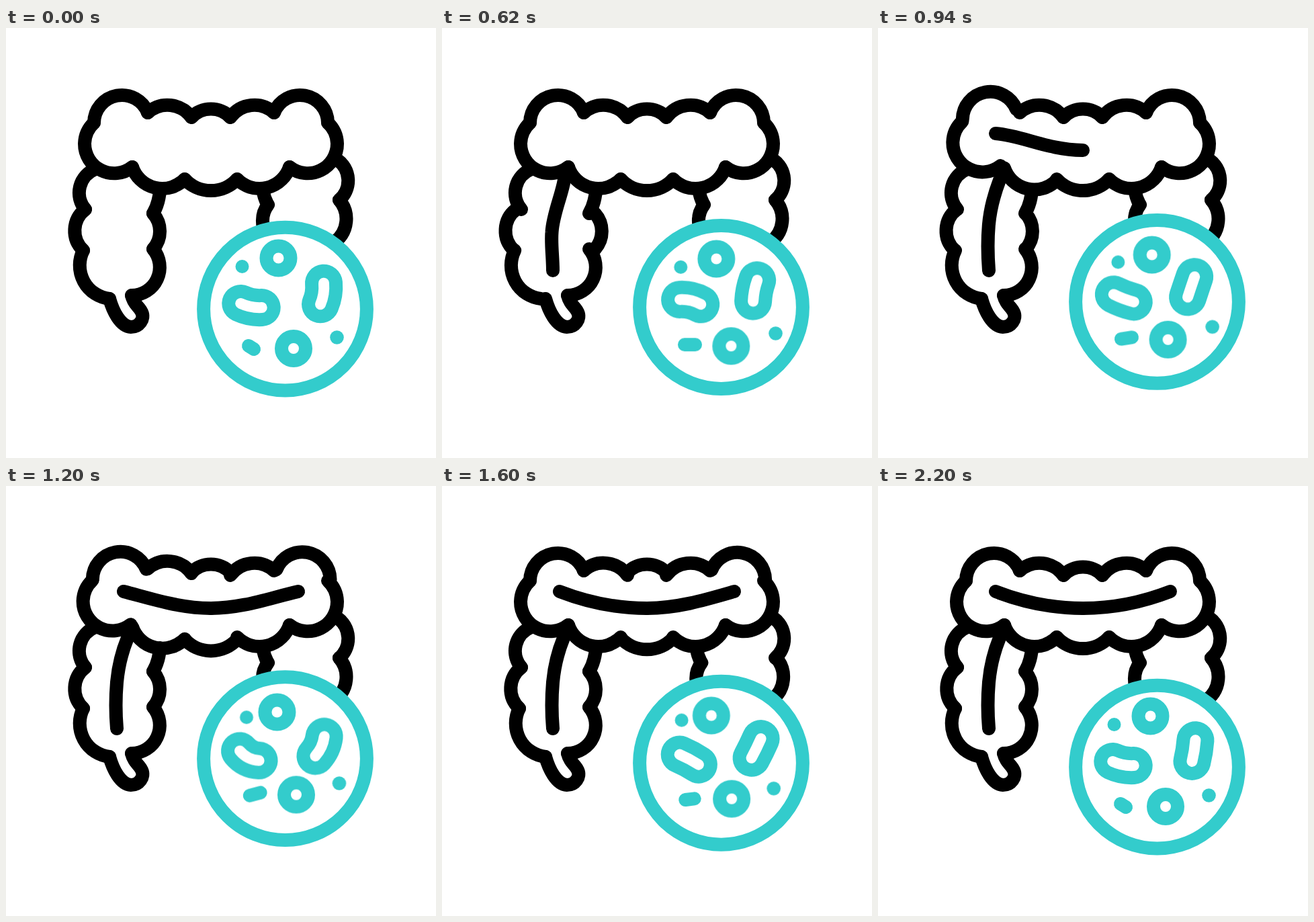
These frames come from a looping animation (640x640 px, 2.4 s). An HTML page without scripts:

```html
<!DOCTYPE html>
<html lang="en">
<head>
<meta charset="utf-8">
<title>Gut flora</title>
<style>
html, body { margin: 0; width: 100%; height: 100%; overflow: hidden; background: #fff; }
svg { display: block; width: 100%; height: 100%; }
path, circle { fill: none; stroke-width: 20; stroke-linecap: round; stroke-linejoin: round; }
.gut { stroke: #000; }
.lens { stroke: #33cccc; }
.dot { fill: #33cccc; stroke: none; }
.plate { fill: #fff; }

/* halves of the crossing part, drawn once and mirrored */
.corner { d: path("M131,141A41.5,41.5 0 0 1 211,126"); }
.small { d: path("M211,126A44,44 0 0 1 276,133"); }
.under { d: path("M266,225A47,47 0 0 1 188,207"); }
.side { d: path("M188,207A44,44 0 0 1 117,172A44,44 0 0 1 131,141"); }

/* every lobe swells once by (--x, --y); --t is when its wave arrives */
[style*="--t"] { animation: swell 2400ms ease-in-out var(--t) infinite; }
.gut .band { animation-name: bend; }
.gut .riseband { animation-name: lean; }
@keyframes swell {
  0%, 30%, 100% { translate: 0 0; }
  15% { translate: var(--x, 0px) var(--y, 0px); }
}
@keyframes bend {
  0%, 30%, 100% { d: path("M175,157C218,173.7 262,182 305,182"); }
  15% { d: path("M175,157C218,160 250,181 305,182"); }
}
@keyframes lean {
  0%, 30%, 100% { d: path("M181,226C172,248 167,270 165,292C163,315 163,338 165,361"); }
  15% { d: path("M182,226C178,250 165,278 163.5,304C162,322 165,340 165,361"); }
}

/* the lens rises and sinks, its contents float inside it */
.lens { animation: bob 2400ms infinite; }
.cell { animation: drift 2400ms infinite, sway 2400ms ease-in-out infinite; }
.pod { animation: drift 2400ms infinite, turn 2400ms ease-in-out infinite; }
.pod path { animation: wiggle 2400ms linear var(--lag, 0ms) infinite backwards; stroke-width: 56; }
.pod .core { stroke: #fff; stroke-width: 16; }
.pill { animation: pill 2400ms linear infinite; }
@keyframes bob {
  0%, 9.17% { translate: 0 0; animation-timing-function: cubic-bezier(.65, 0, .5, 1); }
  50% { translate: 0 -12.5px; animation-timing-function: cubic-bezier(.3, 0, .4, 1); }
  91.67%, 100% { translate: 0 0; }
}
@keyframes drift {
  0%, 9.17% { translate: 0 0; animation-timing-function: ease-out; }
  50% { translate: var(--x, 0px) var(--y, 0px); animation-timing-function: ease-in; }
  91.67%, 100% { translate: 0 0; }
}
@keyframes sway {
  0%, 9.17%, 91.67%, 100% { transform: translate(0, 0); }
  32% { transform: translate(var(--sx, 0px), var(--sy, 0px)); }
  63% { transform: translate(calc(-1 * var(--sx, 0px)), calc(-1 * var(--sy, 0px))); }
}
@keyframes turn {
  0%, 15%, 91.67%, 100% { rotate: var(--a); }
  62% { rotate: calc(var(--a) + 18deg); }
}
@keyframes wiggle {
  0%, 9.17%, 91.67%, 100% { d: path("M-16,0Q0,4 16,0"); }
  25.83% { d: path("M-12,-3.5Q4,-8 20,-3.5"); }
  50% { d: path("M-18,2Q-2,9 14,2"); }
  75.83% { d: path("M-11,-3Q5,-9 21,-3"); }
}
@keyframes pill {
  0%, 9.17%, 91.67%, 100% { d: path("M361,473L369,478"); }
  25.83% { d: path("M361,474L377,474"); }
  54% { d: path("M363,473L379,468"); }
}
</style>
</head>
<body>
<svg viewBox="0 0 640 640">
  <g class="gut">
    <!-- right side, going down -->
    <path d="M493,196A38,38 0 0 1 496,256"/>
    <path d="M496,256A43,43 0 0 1 490,318" style="--x:4px;--t:1440ms"/>
    <path d="M383,243Q384,254 390,263Q379,277 383,297" style="--x:-9px;--t:1440ms"/>

    <!-- left side, going up -->
    <path d="M133,210A38,38 0 0 0 118,270"/>
    <path d="M118,270A40,40 0 0 0 115,331" style="--x:-8px;--t:300ms"/>
    <path d="M115,331A50,50 0 0 0 154,403" style="--x:-7px;--t:220ms"/>
    <path d="M154,403C159,421 170,444 186,445C198,445 207,433 202,423C198,414 190,412 187,398"/>
    <path d="M187,398A42,42 0 0 0 219,329"/>
    <path d="M219,329A40,40 0 0 0 219,276" style="--x:9px;--t:300ms"/>
    <path d="M219,276Q228,260 229,241"/>
    <path class="riseband" style="--t:300ms"/>

    <!-- crossing part -->
    <path class="side" style="--x:-6px;--y:-2px;--t:640ms"/>
    <path class="corner" style="--x:-5.5px;--y:-5.5px;--t:640ms"/>
    <path class="small" style="--y:-3.5px;--t:940ms"/>
    <path class="under" style="--y:3px;--t:760ms"/>
    <path class="band" style="--t:640ms"/>
    <path d="M276,133A40,40 0 0 1 334,133" style="--y:-10px;--t:1040ms"/>
    <path d="M344,225A53,53 0 0 1 266,225" style="--y:5.5px;--t:1000ms"/>
    <g transform="matrix(-1 0 0 1 610 0)">
      <path class="side"/>
      <path class="corner" style="--x:-7px;--y:-3.5px;--t:1020ms"/>
      <path class="small"/>
      <path class="under"/>
      <path class="band" style="--t:1020ms"/>
    </g>
  </g>

  <g class="lens">
    <circle class="plate" cx="415.5" cy="418.2" r="121.4"/>
    <circle class="cell dot" cx="351.5" cy="355" r="10" style="--x:6.5px;--y:2.5px;--sy:2.5px"/>
    <circle class="cell dot" cx="492.5" cy="460.5" r="10.3" style="--x:4px;--y:-5.5px;--sx:2px"/>
    <circle class="cell" cx="405.5" cy="342.5" r="18" style="--x:-1px;--y:6.5px;--sx:4px"/>
    <circle class="cell" cx="428" cy="477" r="18" style="--x:4px;--y:-4.5px;--sy:2px"/>
    <path class="pill"/>
    <g transform="translate(365 413)">
      <g class="pod" style="--a:11deg"><path/><path class="core"/></g>
    </g>
    <g transform="translate(470.5 395.5)">
      <g class="pod" style="--a:-81deg;--x:-4px;--y:3px;--lag:100ms"><path/><path class="core"/></g>
    </g>
  </g>
</svg>
</body>
</html>
```
